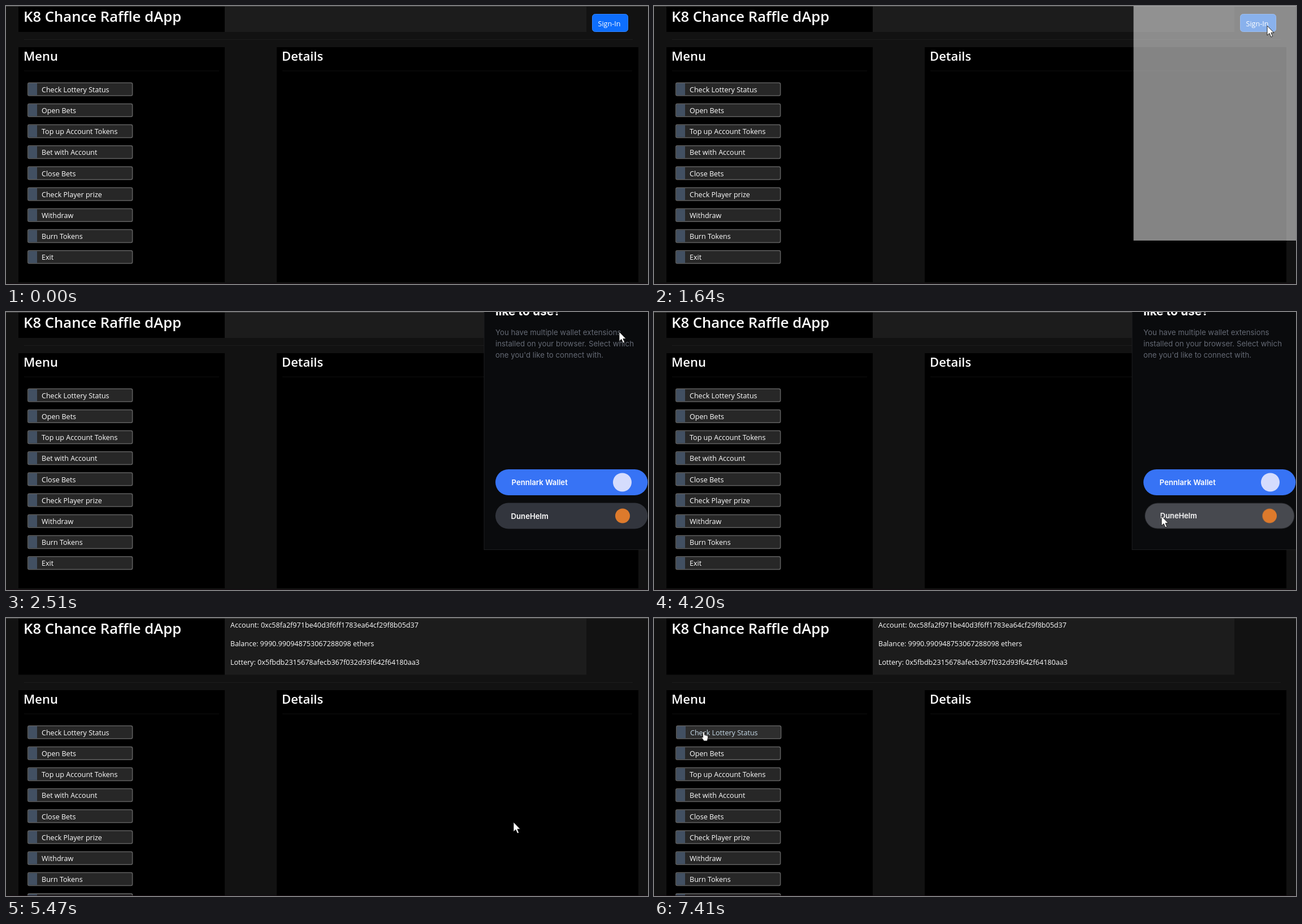
An HTML page that plays this animation: 1136 px wide and 493 px high, repeating every 8 s.

```html
<!DOCTYPE html>
<html lang="en">
<head>
<meta charset="utf-8">
<title>Raffle dApp</title>
<style>
html, body { margin: 0; width: 100%; height: 100%; overflow: hidden; background: #121212; }
svg { display: block; width: 100%; height: 100%; }
text { font: 12.55px "Open Sans", "Noto Sans", sans-serif; fill: #fff; white-space: pre; }
.h1 { font-size: 25.7px; font-weight: 600; }
.h2 { font-size: 22px; font-weight: 600; }
.row text, .sign text { font-weight: 500; }
.popup text { font-family: Inter, "Noto Sans", sans-serif; }
.popup .ask { font-size: 21px; font-weight: 700; }
.popup .note { font-size: 13.25px; fill: #646974; }
.popup .label { font-size: 13.2px; font-weight: 600; }
.rule { fill: #1d1d1d; }
.thin { fill: #111; }
.row rect { fill: #272727; stroke: #606060; stroke-width: 1.5; }
.row .tab { fill: #425062; stroke: none; }
.sign rect { fill: #0d6efd; stroke: #3384fd; }
.pill { fill: #32353d; }
.cursor path { fill: #fff; stroke: #111; stroke-width: .9; stroke-linejoin: round; }
.cursor .beam { fill: none; stroke: #fff; stroke-width: 1.3; }

/* One loop is 8 s, so 1% is 80 ms. */
.lower, .before, .after, .sign rect, .first, .first text, .first .body,
.popup, .blank, .content, .wallet, .pill, .cursor, .arrow, .hand, .beam {
  animation: 8s step-end infinite;
}
.lower { animation-name: lower; }
.before { animation-name: before; }
.after { animation-name: after; }
.sign rect { animation-name: sign; }
.first { animation-name: nudge; }
.first text { animation-name: rowText; }
.first .body { animation-name: rowBody; }
.popup { animation-name: popup; }
.blank { animation-name: blank; }
.content { animation-name: content; }
.wallet { animation-name: press; transform-origin: 1000.5px 361.5px; }
.pill { animation-name: pill; }
.cursor { animation-name: move; }
.arrow { animation-name: arrow; }
.hand { animation-name: hand; }
.beam { animation-name: beam; }

@keyframes lower { 0% { transform: none } 54.3%, 100% { transform: translateY(55px) } }
@keyframes before { 0% { opacity: 1 } 54.3%, 100% { opacity: 0 } }
@keyframes after { 0% { opacity: 0 } 54.3%, 100% { opacity: 1 } }
@keyframes sign {
  0% { fill: #0d6efd; stroke: #3384fd }
  9%, 100% { fill: #0b5ed7; stroke: #3579dd }
}
@keyframes nudge { 0% { transform: none } 84.8%, 100% { transform: translateX(1px) } }
@keyframes rowText { 0% { fill: #fff } 84.8%, 100% { fill: #c6dae8 } }
@keyframes rowBody { 0% { fill: #272727 } 84.8%, 100% { fill: #2e2e2e } }
@keyframes popup {
  0% { opacity: 0; transform: none }
  18.55% { opacity: .1; transform: translate(9px, -18px) }
  19.45% { opacity: .3; transform: translate(6px, -12px) }
  20.45% { opacity: .52; transform: translate(3px, -6px) }
  21.7% { opacity: .78; transform: translate(1px, -2px) }
  22.3% { opacity: .93; transform: none }
  23.45% { opacity: 1; transform: none }
  53.45% { opacity: .4; transform: translate(3px, -6px) }
  54.3%, 100% { opacity: 0; transform: none }
}
@keyframes blank {
  0% { fill: #fff; stroke: #fff }
  21.7% { fill: #121212; stroke: #161616 }
  23.45%, 100% { fill: #0a0b0d; stroke: #1d1e20 }
}
@keyframes content {
  0% { opacity: 0 }
  28.7% { opacity: .3 }
  29.55% { opacity: .6 }
  30.45% { opacity: .85 }
  31.3%, 100% { opacity: 1 }
}
@keyframes press { 0% { transform: none } 51.55%, 100% { transform: scale(.98) } }
@keyframes pill { 0% { fill: #32353d } 51.55%, 100% { fill: #47494f } }

@keyframes move {
  0% { transform: translate(1092px, 520px) }
  .82% { transform: translate(1085px, 535px); animation-timing-function: steps(4, start) }
  4.63% { transform: translate(1136px, 256px) }
  6.2% { transform: translate(1140px, 32px); animation-timing-function: steps(3, start) }
  9% { transform: translate(1100px, 33px); animation-timing-function: steps(6, start) }
  14.63% { transform: translate(1085px, 35px) }
  44.8% { transform: translate(1085px, 35px); animation-timing-function: steps(4, start) }
  48.3% { transform: translate(898px, 362px) }
  69.2% { transform: translate(898px, 362px); animation-timing-function: steps(3, start) }
  71.8% { transform: translate(850px, 325px); animation-timing-function: steps(4, start) }
  75.2% { transform: translate(640px, 130px); animation-timing-function: steps(4, start) }
  78.7% { transform: translate(534px, 41px); animation-timing-function: steps(4, start) }
  82.2% { transform: translate(300px, 12px); animation-timing-function: steps(4, start) }
  85.7% { transform: translate(60px, 193px); animation-timing-function: steps(3, start) }
  88.3% { transform: translate(44px, 204px) }
  89.95% { transform: translate(44px, 204px); animation-timing-function: steps(4, start) }
  93.4%, 100% { transform: translate(88px, 201.5px) }
}
@keyframes arrow {
  0% { opacity: 1 } 9% { opacity: 0 } 19.45% { opacity: 1 }
  77.8% { opacity: 0 } 82.2% { opacity: 1 } 84.8%, 100% { opacity: 0 }
}
@keyframes hand {
  0% { opacity: 0 } 9% { opacity: 1 } 19.45% { opacity: 0 } 84.8%, 100% { opacity: 1 }
}
@keyframes beam { 0% { opacity: 0 } 77.8% { opacity: 1 } 82.2%, 100% { opacity: 0 } }
</style>
</head>
<body>
<svg viewBox="0 0 1136 493">
  <rect width="1136" height="493" fill="#121212"/>

  <!-- Header -->
  <rect x="22" y="1" width="365" height="45"/>
  <rect x="387" y="1" width="640" height="45" fill="#1c1c1c"/>
  <g class="after">
    <rect x="22" y="1" width="365" height="99.5"/>
    <rect x="387" y="1" width="640" height="99.5" fill="#1c1c1c"/>
    <text x="397" y="16.5">Account: 0xc58fa2f971be40d3f6ff1783ea64cf29f8b05d37</text>
    <text x="397" y="49.8">Balance: 9990.990948753067288098 ethers</text>
    <text x="397" y="83">Lottery: 0x5fbdb2315678afecb367f032d93f642f64180aa3</text>
  </g>
  <rect width="1136" height="1" fill="#444"/>
  <text class="h1" x="31" y="27.5">K8 Chance Raffle dApp</text>
  <g class="before sign">
    <rect x="1037.5" y="14.5" width="63" height="31" rx="5"/>
    <text x="1047.5" y="36">Sign-In</text>
  </g>

  <!-- Menu and details -->
  <g class="lower">
    <rect class="rule" x="32" y="59" width="1077" height="1"/>
    <rect x="22" y="73" width="365" height="417"/>
    <rect x="479" y="73" width="640" height="417"/>
    <text class="h2" x="31" y="97">Menu</text>
    <text class="h2" x="488" y="97">Details</text>
    <rect class="thin" x="32" y="114.5" width="345" height="1"/>
    <rect class="thin" x="489" y="114.5" width="619" height="1"/>
    <g id="menu"></g>
  </g>
  <rect y="492" width="1136" height="1" fill="#1a0f15"/>

  <!-- Wallet chooser -->
  <g class="popup">
    <rect class="blank" x="846" y="-60" width="400" height="481.5"/>
    <g class="content">
      <text class="ask" x="866" y="6">like to use?</text>
      <text class="note" x="866" y="41">You have multiple wallet extensions</text>
      <text class="note" x="866" y="61">installed on your browser. Select which</text>
      <text class="note" x="866" y="81">one you'd like to connect with.</text>
      <rect x="866" y="279" width="269.5" height="46" rx="23" fill="#3773f5"/>
      <text class="label" x="894.5" y="306.5">Pennlark Wallet</text>
      <circle cx="1090.5" cy="302" r="16.5" fill="#d5dcfd"/>
      <g class="wallet">
        <rect class="pill" x="866" y="338.5" width="269.5" height="46" rx="23"/>
        <text class="label" x="893.5" y="366.5">DuneHelm</text>
        <circle cx="1091" cy="361.5" r="13" fill="#dd7a2c"/>
      </g>
    </g>
  </g>

  <g class="cursor">
    <path class="arrow" d="M0 0V17L4 13.4 6.8 20 9.6 18.8 6.9 12.4H12Z"/>
    <path class="hand" d="M-1.5 1.5a1.5 1.5 0 0 1 3 0V6l5 1.2q1.5.4 1.3 2L7 13.5l-1 3H.5l-3.8-5q-.8-1.5.6-1.8l1.2.8z"/>
    <path class="beam" d="M-3-9H-1Q0-9 0-8 0-9 1-9H3M0-8V8M-3 9H-1Q0 9 0 8 0 9 1 9H3"/>
  </g>
</svg>
<script>
const labels = ["Check Lottery Status", "Open Bets", "Top up Account Tokens", "Bet with Account",
  "Close Bets", "Check Player prize", "Withdraw", "Burn Tokens", "Exit"];
const pitch = 37.2;
document.getElementById("menu").innerHTML = labels.map((label, i) => `
  <g transform="translate(0 ${(i * pitch).toFixed(1)})"><g class="row ${i ? "" : "first"}">
    <rect class="body" x="38.7" y="136.2" width="185" height="22.8" rx="2.5"/>
    <rect class="tab" x="39.5" y="137" width="15.5" height="21.2"/>
    <text x="63" y="152.8">${label}</text>
  </g></g>`).join("");
</script>
</body>
</html>
```
